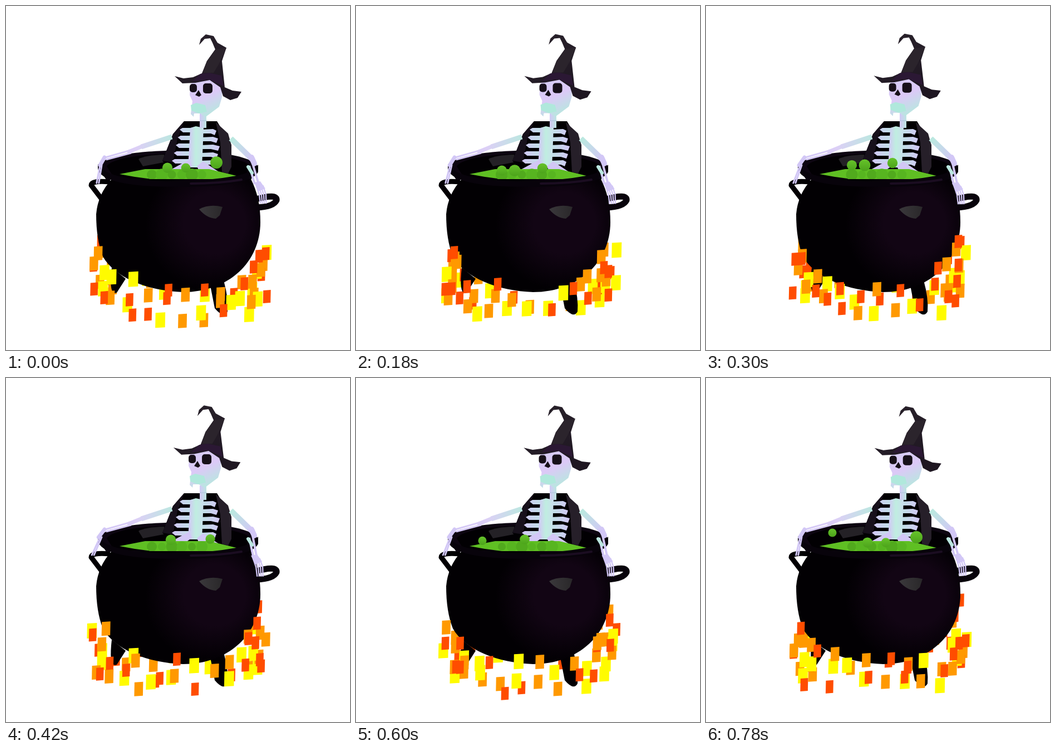
Recreate the animation shown at these times as an HTML page with a canvas. Size 618x618 px, loop 840 ms.

```html
<!DOCTYPE html>
<html lang="en">
<head>
<meta charset="utf-8">
<title>Skeleton in a cauldron</title>
<style>
  html, body { margin: 0; width: 100%; height: 100%; overflow: hidden; background: #fff; }
  canvas { display: block; }
</style>
</head>
<body>
<canvas id="stage" width="618" height="618"></canvas>
<script>
const ctx = document.getElementById('stage').getContext('2d');
const LOOP = 840, STEP = 60;
const LILAC = '#d2c7f6', MINT = '#bbe8e0', INK = '#020003', EYE = '#171019';

let seed = 41;
const random = () => (seed = (seed * 16807) % 2147483647) / 2147483647;
const between = (a, b) => a + (b - a) * random();
const ageAt = (t, birth) => (t - birth + LOOP) % LOOP;

function fill(path, color) {
  ctx.fillStyle = color;
  ctx.fill(new Path2D(path));
}

function line(path, color, width, cap = 'butt') {
  Object.assign(ctx, { strokeStyle: color, lineWidth: width, lineCap: cap, lineJoin: 'round' });
  ctx.stroke(new Path2D(path));
}

function disc(x, y, r, color) {
  ctx.fillStyle = color;
  ctx.beginPath();
  ctx.arc(x, y, r, 0, 2 * Math.PI);
  ctx.fill();
}

function gradient(x0, y0, x1, y1, ...colors) {
  const g = ctx.createLinearGradient(x0, y0, x1, y1);
  colors.forEach((c, i) => g.addColorStop(i / (colors.length - 1), c));
  return g;
}

function shifted(x, y, draw) {
  ctx.save();
  ctx.translate(x, y);
  draw();
  ctx.restore();
}

// Fire: cards rise from a ring around the pot, each keeping its colour.
// Irrational steps spread angles and births evenly.
const FIRE = ['#fffb00', '#ff9900', '#ff4d00'];
const FLAMES = 285;
const flames = Array.from({ length: FLAMES }, (_, i) => {
  const kind = Math.floor(i * 3 / FLAMES);
  const angle = Math.PI * ((i * 0.7549 % 1) * 1.1 - 0.05);
  return {
    kind,
    x: 312 + between(132, 158) * Math.cos(angle),
    y: 520 + 40 * Math.sin(angle) + between(-18, 18),
    birth: LOOP * (i * 0.5698 % 1),
    life: kind ? between(150, 290) : between(110, 180),
    near: i % 3 > 0
  };
});
const potBottom = x => 514 - 90 * Math.abs((x - 311) / 147) ** 3;

function drawFire(t, inFront) {
  for (const { kind, x, y, birth, life, near } of flames) {
    const age = ageAt(t, birth);
    if (age >= life) continue;
    const top = y - age * 0.45;
    if ((near && top > potBottom(x) - 10) !== inFront) continue;
    const w = 9 - kind, h = 14 - kind;
    fill(`M${x - w + 0.5} ${top - h + 1}L${x + w} ${top - h}L${x + w - 0.5} ${top + h - 1}L${x - w} ${top + h}Z`, FIRE[kind]);
  }
}

// Bubbles: x and time of birth
const bubbles = [
  [227, 530], [262, 150], [285, 150], [335, 100], [290, 750],
  [303, 500], [323, 750], [367, 310], [378, 630], [296, 330]
].map(([x, birth]) => ({ x, birth, r: between(7.5, 11) }));

function drawBubbles(t) {
  for (const { x, birth, r } of bubbles) {
    const age = ageAt(t, birth), y = 298 - age * 0.08;
    if (age < 270) disc(x, y, r, gradient(0, y - r, 0, y + r, '#66c32a', '#4ca31b'));
  }
}

function drawSoup(t) {
  fill('M204 302L250 293H365L414 305Q310 324 204 302Z', '#5fbf23');
  for (let i = 0; i < 6; i++) {
    const swell = Math.sin(2 * Math.PI * t / LOOP + i * 2);
    disc(262 + i * 18, 303, 9 + 2 * swell, i % 2 ? '#57b520' : '#51aa1d');
  }
  drawBubbles(t);
}

function drawLegs() {
  fill('M190 470L215 490 199 515Q184 522 190 470Z', INK);
  fill('M366 497L391 493Q400 525 398 549Q391 562 375 543Z', INK);
}

function drawPotBack() {
  line('M187 316Q153 313 153 322L172 347', INK, 9);
  line('M446 348Q488 336 486 349Q480 361 450 362', '#08030b', 11);
  fill('M165 289C175 250 440 250 453 290L440 312H180Z', '#0d0511');
  fill('M181 288C200 258 410 258 441 288L425 310H195Z', INK);
  fill('M238 275Q250 268 284 267L288 280 246 288Z', '#242126');
}

function drawPotFront() {
  const glow = ctx.createRadialGradient(375, 390, 55, 365, 395, 115);
  glow.addColorStop(0, '#120514');
  glow.addColorStop(1, INK);
  fill('M190 311H440Q457 344 457 388C457 460 400 514 318 514C255 512 195 488 174 450Q162 420 162 374Q165 338 190 311Z', glow);
  fill('M347 365Q366 355 389 361L384 376 377 382Q360 381 347 365Z', gradient(348, 0, 390, 0, '#3a383b', '#292729'));
  fill('M165 284Q180 315 311 315Q435 313 453 285V298Q440 325 311 325Q168 325 165 291Z', '#08030b');
  line('M332 319Q382 319 423 312', '#1b0d21', 4, 'round');
}

function drawTorso() {
  fill('M281 278L300 230 320 207H379L405 250V289L399 301H300Z', INK);
  fill('M281 278L300 230 320 207 308 239 300 281Z', '#17101b');
  fill('M377 209L399 229 405 250V289L399 301 388 298 385 245Z', '#261f29');

  const bone = gradient(300, 0, 384, 0, LILAC, MINT, LILAC);
  for (let i = 0; i < 5; i++) {
    const y = 218 + i * 14, left = 312 - i * 3.5, right = 384 - Math.abs(i - 2) * 3;
    fill(`M334 ${y + 1}H${left + 5}L${left} ${y + 4}L${left + 6} ${y + 9}H334Z`, bone);
    fill(`M350 ${y + 4}L372 ${y + 3}L${right} ${y + 6}L${right - 3} ${y + 14}L368 ${y + 11}H350Z`, bone);
  }
  fill('M331 219L341 216 355 219 352 290H327Z', gradient(328, 0, 354, 0, LILAC, '#bfeee0', '#c9e0ec'));
  fill('M296 294L329 276 334 287 318 299Z', LILAC);
  fill('M343 288L354 279 381 297 372 304H350Z', LILAC);
}

function drawArms(sway) {
  const hand = -9 * sway;
  const upper = gradient(170, 0, 300, 0, LILAC, '#dccff6', MINT);
  line('M298 235L243 253', upper, 9);
  line('M245 252L218 263', upper, 7);
  line('M224 259L175 273M225 264L180 276', upper, 3);
  line(`M177 272L${169 + hand * 0.3} 286`, LILAC, 7, 'round');
  for (let i = 0; i < 2; i++) {
    line(`M${169 + 3 * i} 286L${163 + 4 * i + hand} 318`, LILAC, 3, 'round');
  }

  line('M404 238L443 276', gradient(405, 242, 443, 276, MINT, LILAC), 10);
  line('M441 272L446 283', LILAC, 10, 'round');
  line(`M443 283L${454 - 4 * sway} 320M437 287L${447 - 3 * sway} 320`, LILAC, 4);
  line('M435 289L442 300', MINT, 6, 'round');
  shifted(-6 * sway, 2 * sway, () => {
    fill('M446 317L457 315 466 328 453 333Z', LILAC);
    for (let i = 0; i < 4; i++) {
      line(`M${450 + 4 * i} 323L${455 + 4 * i} 338L${457 + 3.5 * i} 354`, LILAC, 2.3, 'round');
    }
  });
}

function drawHead(sway) {
  line('M354 193V219', gradient(348, 0, 361, 0, LILAC, MINT), 12);
  line('M348 206H361', '#a9c0d8', 1);
  shifted(-2 * sway, -2 * sway, () => {
    fill('M331 141L341 132H376L388 144V164L383 181 359 199 348 193H338L337 199 332 194 335 171 330 160Z',
      gradient(335, 135, 365, 196, '#d6cdf5', '#dcc9f7', '#b9e6e0'));
    fill('M332 178L342 174 358 178 361 190 347 193 333 188Z', '#b0e8dc');
    ctx.fillStyle = EYE;
    ctx.beginPath();
    ctx.roundRect(330, 140, 13, 15, 5);
    ctx.roundRect(354, 139, 17, 18, 5);
    ctx.fill();
    fill('M340 160L346 151 351 160 347 163Z', EYE);

    // hat
    ctx.translate(365, 140);
    ctx.rotate(-0.016 * sway);
    ctx.translate(-365, -140);
    fill('M303 126L319 130 336 128 352 121 361 99 376 78 371 66 367 58 357 59 347 70 350 59 359 51 373 54 380 66 396 75 388 99 393 146 407 152 423 154 416 165 403 169 390 162 385 146 366 133 340 138 317 139Z',
      gradient(350, 70, 395, 140, '#272029', '#1f1722'));
    fill('M376 78L396 75 382 105 373 120H353L361 99Z', '#2b242c');
    fill('M349 122L365 120 387 125 391 144 365 132 335 135Z', '#2b1834');
  });
}

function render(t) {
  const sway = (1 - Math.cos(2 * Math.PI * (t - 40) / LOOP)) / 2;
  ctx.fillStyle = '#fff';
  ctx.fillRect(0, 0, 618, 618);
  drawFire(t, false);
  drawLegs();
  drawPotBack();
  drawTorso();
  drawSoup(t);
  drawPotFront();
  drawFire(t, true);
  drawArms(sway);
  drawHead(sway);
}

const start = performance.now();
function tick() {
  const elapsed = (performance.now() - start) % LOOP;
  render(Math.floor(elapsed / STEP) * STEP);
  requestAnimationFrame(tick);
}
tick();
</script>
</body>
</html>
```
